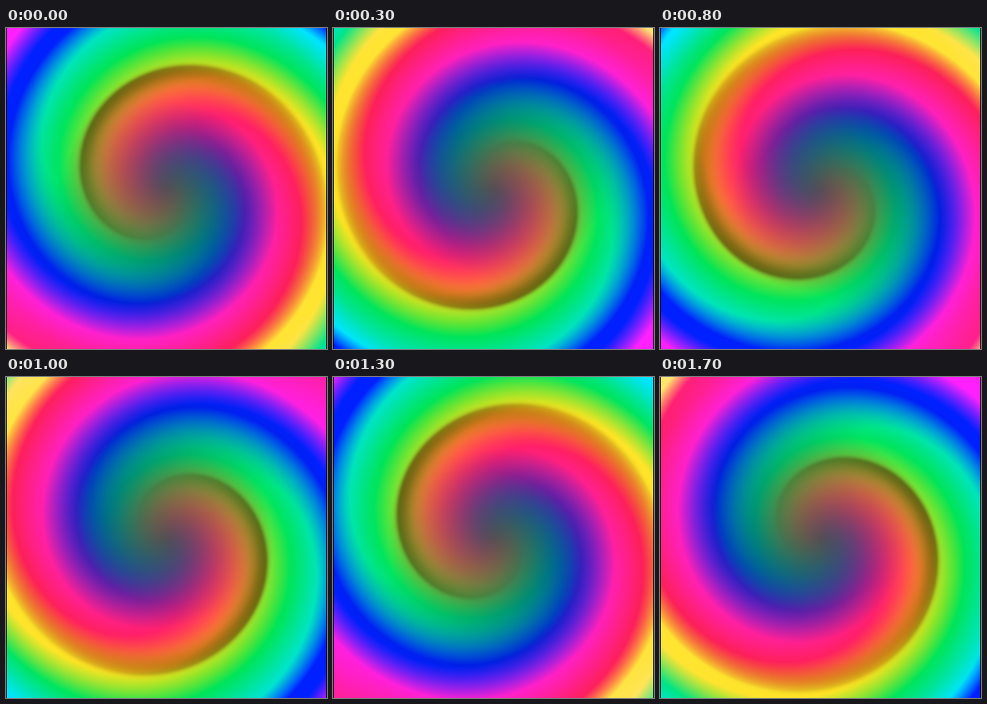
Write an HTML page with a canvas that moves like this. It is 402x402 px and loops after 1800 ms.

```html
<!DOCTYPE html>
<html lang="en">
<head>
<meta charset="utf-8">
<title>Colour swirl</title>
<style>
  html, body { margin: 0; width: 402px; height: 402px; overflow: hidden; background: #000; }
  canvas { display: block; }
</style>
</head>
<body>
<canvas id="stage" width="402" height="402"></canvas>
<script>
const SIZE = 402, CENTER = 201, TAU = Math.PI * 2;
const STEPS = 18, STEP_MS = 100;
const WINDING = 40; // pixels of radius per radian of twist
const ctx = document.getElementById('stage').getContext('2d');
const cache = [];

const clamp = (v, lo, hi) => Math.max(lo, Math.min(hi, v));
const gauss = x => Math.exp(-x * x);

// Dark olive crease, soft on the inside and sharp on the outside.
function crease(phase, r) {
  const ridge = 5.3 - 0.008 * (r - 149);
  let d = (phase - ridge) % TAU;
  if (d > Math.PI) d -= TAU;
  if (d < -Math.PI) d += TAU;
  return gauss(d / (d < 0 ? 0.6 : 0.15)) * gauss((r - 135) / 50);
}

function render(step) {
  const image = ctx.createImageData(SIZE, SIZE);
  const px = image.data;
  for (let y = 0, i = 0; y < SIZE; y++) {
    for (let x = 0; x < SIZE; x++, i += 4) {
      px[i + 3] = 255;
      if (x === 0 || x === SIZE - 1) continue; // black side edges
      const dx = x - CENTER, dy = CENTER - y;
      const r = Math.hypot(dx, dy);
      let phase = (r / WINDING + Math.atan2(dy, dx) - step) % TAU;
      if (phase < 0) phase += TAU;

      const dark = crease(phase, r);
      const red = 85 + 0.25 * r + 1.3 * r * Math.cos(phase - 4.1);
      const green = 78 + 0.2 * r + (0.45 * r + 0.0038 * r * r) * Math.cos(phase + 0.2);
      const blue = 85 + 0.3 * r + Math.max(0, r - 235)
        + Math.min(0.6 * r, 105) * Math.cos(phase - 2.05);
      px[i] = clamp(red, 0, 255) * (1 - 0.33 * dark);
      px[i + 1] = clamp(green, 32, 228) * (1 - 0.48 * dark);
      px[i + 2] = clamp(blue, 0, 255) * (1 - 0.6 * dark);
    }
  }
  return image;
}

let shown = -1;
function draw() {
  const step = Math.floor(performance.now() / STEP_MS) % STEPS;
  if (step !== shown) {
    cache[step] = cache[step] || render(step);
    ctx.putImageData(cache[step], 0, 0);
    shown = step;
  }
  requestAnimationFrame(draw);
}
draw();
</script>
</body>
</html>
```
